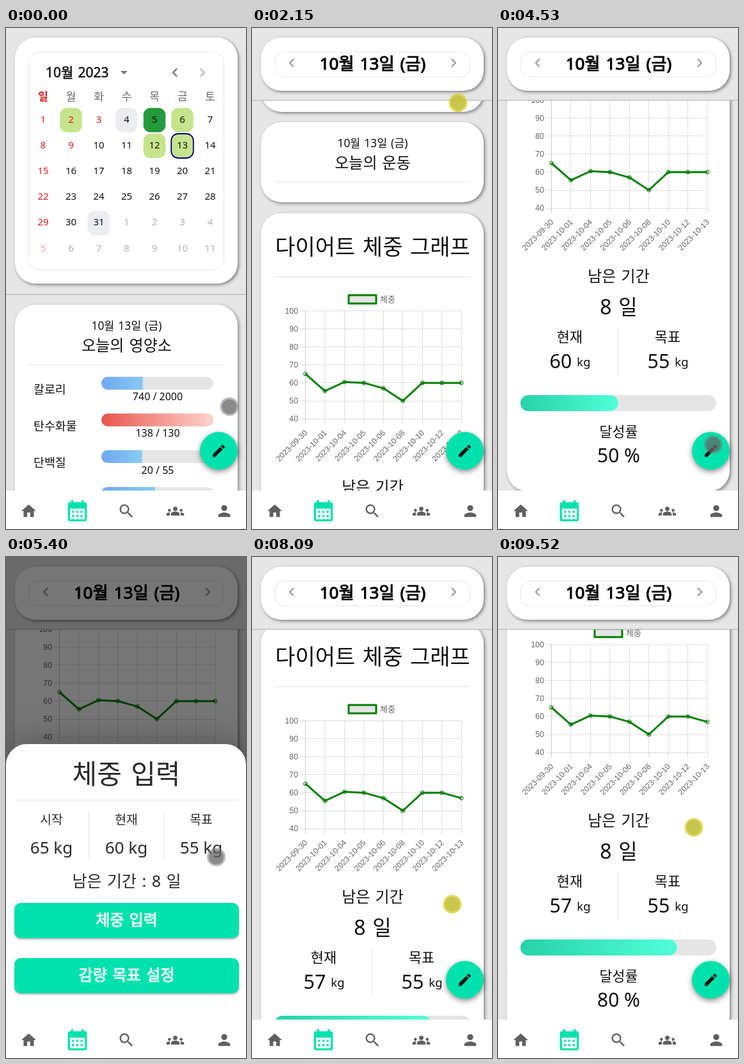
An HTML page with a canvas for the animation above (9920 ms loop, 375 px wide and 782 px high).

```html
<!DOCTYPE html>
<html lang="ko">
<head>
<meta charset="utf-8">
<style>
html, body { margin: 0; width: 100%; height: 100%; overflow: hidden; background: #e6e6e6; }
canvas { display: block; }
</style>
</head>
<body>
<canvas id="stage" width="375" height="782"></canvas>
<script>
const ctx = document.getElementById('stage').getContext('2d');
const LOOP = 9920, NAV_TOP = 722, FOLD_TIME = 1680;
const SANS = '"Noto Sans", "Noto Sans CJK KR", sans-serif';
const ARIAL = '"Liberation Sans", "Noto Sans CJK KR", sans-serif';
const MINT = '#00e2ad', RED = '#e4181c', GREEN = '#008000', TODAY = '10월 13일 (금)';

// time, pointer x, pointer y, list scroll
const TRACK = [
  [390, 349, 591, 0], [900, 292, 396, 0], [1330, 306, 462, 0], [1400, 306, 462, 0],
  [2150, 322, 117, 345], [2480, 322, 20, 442], [2900, 328, 567, 442], [3440, 315, 395, 614],
  [3627, 312, 335, 674], [3760, 312, 335, 674], [4390, 338, 645, 674], [4800, 333, 660, 674],
  [5080, 333, 660, 674], [5400, 329, 468, 674], [5650, 215, 550, 674], [5930, 215, 550, 674],
  [6460, 190, 385, 674], [6720, 190, 385, 674], [7120, 135, 458, 674], [7580, 135, 458, 674],
  [7800, 305, 399, 674], [8090, 313, 542, 531], [8570, 310, 487, 586], [9520, 306, 422, 650],
];
const PRESSES = [[1400, 2480], [2900, 3760], [4950, 5080], [5860, 5930], [7140, 7210], [7800, LOOP]];

const ICONS = {
  home: 'M10 20v-6h4v6h5v-8h3L12 3 2 12h3v8z',
  calendar: 'M6 2h2v2h8V2h2v2h1a2 2 0 0 1 2 2v14a2 2 0 0 1-2 2H5a2 2 0 0 1-2-2V6a2 2 0 0 1 2-2h1z' +
    'M5 10v10h14V10zM7 12h2v2H7zm4 0h2v2h-2zm4 0h2v2h-2zM7 16h2v2H7zm4 0h2v2h-2zm4 0h2v2h-2z',
  search: 'M15.5 14h-.8l-.3-.3A6.5 6.5 0 1 0 13.7 14.4l.3.3v.8l5 5 1.5-1.5zM9.5 14a4.5 4.5 0 1 1 0-9 4.5 4.5 0 0 1 0 9z',
  groups: 'M9 9a3 3 0 0 1 6 0 3 3 0 0 1-6 0zM6 18v-1.6c0-2.5 3.5-3.65 6-3.65s6 1.15 6 3.65V18z' +
    'M2 11a2 2 0 0 1 4 0 2 2 0 0 1-4 0zM0 18v-1.6c0-2 3-2.5 5.1-2.3a4.5 4.5 0 0 0-.6 2.3V18z' +
    'M18 11a2 2 0 0 1 4 0 2 2 0 0 1-4 0zM24 18v-1.6c0-2-3-2.5-5.1-2.3a4.5 4.5 0 0 1 .6 2.3V18z',
  person: 'M12 12a4 4 0 1 0 0-8 4 4 0 0 0 0 8zm0 2c-2.67 0-8 1.34-8 4v2h16v-2c0-2.66-5.33-4-8-4z',
  edit: 'M3 17.25V21h3.75L17.8 9.94l-3.75-3.75zM20.7 7.04a1 1 0 0 0 0-1.41l-2.33-2.34a1 1 0 0 0-1.41 0l-1.83 1.83 3.75 3.75z',
};

const clamp = v => Math.min(1, Math.max(0, v));
const progress = (t, from, to) => clamp((t - from) / (to - from));
const easeOut = p => 1 - (1 - p) ** 3;

function sample(t) {
  const i = TRACK.findIndex(k => k[0] > t);
  if (i === 0) return TRACK[0].slice(1);
  if (i < 0) return TRACK[TRACK.length - 1].slice(1);
  const a = TRACK[i - 1], b = TRACK[i], p = progress(t, a[0], b[0]);
  return [1, 2, 3].map(n => a[n] + (b[n] - a[n]) * p);
}

// A thin outline of the given width makes the text semi-bold.
function text(s, x, y, size, { color = '#111', align = 'center', weight = 400, font = SANS, outline = 0 } = {}) {
  ctx.font = `${weight} ${size}px ${font}`;
  ctx.wordSpacing = /[가-힣]/.test(s) ? `${size * 0.08}px` : '0px';
  ctx.textAlign = align;
  ctx.fillStyle = ctx.strokeStyle = color;
  ctx.fillText(s, x, y + size * 0.37);
  if (!outline) return;
  ctx.lineWidth = outline;
  ctx.lineJoin = 'round';
  ctx.strokeText(s, x, y + size * 0.37);
}

function box(x, y, w, h, r, fill, { stroke, line = 1, shadow } = {}) {
  ctx.save();
  ctx.beginPath();
  ctx.roundRect(x, y, w, h, r);
  if (shadow) [ctx.shadowOffsetX, ctx.shadowOffsetY, ctx.shadowBlur, ctx.shadowColor] = shadow;
  if (fill) { ctx.fillStyle = fill; ctx.fill(); }
  if (stroke) { ctx.strokeStyle = stroke; ctx.lineWidth = line; ctx.stroke(); }
  ctx.restore();
}

function rect(x, y, w, h, color) {
  ctx.fillStyle = color;
  ctx.fillRect(x, y, w, h);
}

function disc(x, y, r, color) {
  ctx.beginPath();
  ctx.arc(x, y, r, 0, 7);
  ctx.fillStyle = color;
  ctx.fill();
}

function icon(name, x, y, size, color) {
  ctx.save();
  ctx.translate(x - size / 2, y - size / 2);
  ctx.scale(size / 24, size / 24);
  ctx.fillStyle = color;
  ctx.fill(new Path2D(ICONS[name]), 'evenodd');
  ctx.restore();
}

function polyline(points, color, width) {
  ctx.beginPath();
  points.forEach(p => ctx.lineTo(...p));
  ctx.strokeStyle = color;
  ctx.lineWidth = width;
  ctx.stroke();
}

function gradient(x, w, from, to) {
  const g = ctx.createLinearGradient(x, 0, x + w, 0);
  g.addColorStop(0, from);
  g.addColorStop(1, to);
  return g;
}

const card = (y, h) => box(14, y, 348, h, 32, '#fff', { shadow: [2, 2, 5, '#808080'] });
const chevron = (x, y, dir, color) =>
  polyline([[x - 3 * dir, y - 6], [x + 3 * dir, y], [x - 3 * dir, y + 6]], color, 2.2);
const button = (x, y, w, h, label, size, fill = MINT, color = '#fff') => {
  box(x, y, w, h, 10, fill, { shadow: fill === MINT && [0, 2, 3, 'rgba(0,0,0,.3)'] });
  text(label, x + w / 2, y + h / 2 - 1, size, { color, outline: 0.8 });
};

function drawCalendar() {
  card(15, 384);
  box(35.5, 37.5, 305, 340, 16, null, { stroke: '#e6e6e6' });
  text('10월 2023', 62, 69, 21, { align: 'left', outline: 0.5 });
  ctx.fillStyle = '#757575';
  ctx.fill(new Path2D('M179 67h11l-5.5 5.5z'));
  chevron(264, 69.5, -1, '#6b6b6b');
  chevron(307, 69.5, 1, '#b5b5b5');
  const marks = { 2: '#c6e48b', 4: '#ebedf0', 5: '#239a3b', 6: '#c6e48b', 12: '#c6e48b', 13: '#c6e48b', 31: '#ebedf0' };
  [...'일월화수목금토'].forEach((d, i) =>
    text(d, 58 + 43.5 * i, 107, 17, { color: i ? '#666' : RED, weight: i ? 400 : 700 }));
  for (let i = 0; i < 42; i++) {
    const x = 58 + 43.5 * (i % 7), y = 142 + 40.2 * Math.floor(i / 7), day = i + 1;
    const next = day > 31, red = i % 7 === 0 || [2, 3, 9].includes(day);
    if (marks[day]) {
      const today = day === 13 && { stroke: '#000080', line: 1.8 };
      box(x - 17.3, y - 17.2, 34.6, 38, 11, marks[day], today || {});
    }
    text(next ? day - 31 : day, x, y, 15, { color: next ? (red ? '#f4a3a4' : '#b0b0b0') : red ? RED : '#111' });
  }
  rect(0, 415, 375, 1.5, '#bbb');
}

function drawDateBar() {
  card(15, 83);
  box(35.5, 37.5, 305, 38.5, 14, null, { stroke: '#e6e6e6' });
  chevron(62, 54.5, -1, '#999');
  chevron(315, 54.5, 1, '#999');
  text(TODAY, 188.5, 55, 26.2, { color: '#000', outline: 1 });
  rect(0, 112.5, 375, 1, '#b0b0b0');
}

function dayCard(y, h, title) {
  card(y, h);
  text(TODAY, 188.5, y + 33, 17.4);
  text(title, 188.5, y + 63.5, 24);
  rect(35, y + 93, 306, 1, '#e6e6e6');
}

function drawNutrition() {
  dayCard(432, 347, '오늘의 영양소');
  [['칼로리', 740, 2000], ['탄수화물', 138, 130], ['단백질', 20, 55], ['지방', 25, 52]].forEach(([name, value, goal], i) => {
    const y = 544.5 + 57.3 * i, w = 175 * Math.min(1, value / goal);
    text(name, 43, y + 19.5, 18.4, { align: 'left' });
    box(149, y, 175, 20, 10, '#e5e5e5');
    box(149, y, w, 20, w < 175 ? [10, 0, 0, 10] : 10,
      value > goal ? gradient(149, w, '#e8564f', '#ffd3cd') : gradient(149, w, '#70a7ee', '#86cbf4'));
    text(`${value} / ${goal}`, 237, y + 30.5, 16);
  });
}

// Origin is the top gridline of the chart.
function drawWeight(lastWeight, kg, ratio) {
  card(-152, 763);
  text('다이어트 체중 그래프', 188.5, -100, 34, { weight: 300 });
  rect(35, -53, 306, 1, '#e6e6e6');
  box(151, -24, 43, 13, 0, '#e5e5e5', { stroke: GREEN, line: 3 });
  text('체중', 200, -18, 13, { align: 'left', color: '#666', font: ARIAL });

  const label = { align: 'right', color: '#666', font: ARIAL };
  const px = i => 83.5 + 30.45 * i, py = v => (100 - v) * 2.81 + 0.5;
  for (let v = 100; v >= 40; v -= 10) {
    rect(75, Math.round(py(v) - 0.5), 252, 1, 'rgba(0,0,0,.12)');
    text(v, 72, py(v) - 0.5, 12.3, label);
  }
  ['09-30', '10-01', '10-04', '10-05', '10-06', '10-08', '10-10', '10-12', '10-13'].forEach((day, i) => {
    rect(Math.floor(px(i)), 0, 1, 177, `rgba(0,0,0,${i ? 0.12 : 0.2})`);
    ctx.save();
    ctx.translate(px(i) + 0.5, 188.5);
    ctx.rotate(-Math.PI / 4);
    text('2023-' + day, 0, 0, 12.3, label);
    ctx.restore();
  });
  const points = [65, 55.5, 60.5, 60, 57, 50, 60, 60, lastWeight].map((v, i) => [px(i), py(v)]);
  polyline(points, GREEN, 3);
  for (const [x, y] of points) {
    disc(x, y, 3, 'rgba(0,0,0,.1)');
    ctx.strokeStyle = GREEN;
    ctx.lineWidth = 1;
    ctx.stroke();
  }

  text('남은 기간', 188.5, 275, 24);
  text('8 일', 188.5, 323, 32);
  [['현재', kg, 112], ['목표', 55, 265]].forEach(([name, value, x]) => {
    text(name, x, 370, 22);
    text(value, x - 14, 408, 30.5);
    text('kg', x + 22, 409, 18.5);
  });
  rect(187, 356, 1, 76, '#e6e6e6');
  box(35, 461, 306, 25, 12.5, '#e5e5e5');
  box(35, 461, 306 * ratio, 25, 12.5, gradient(35, 306 * ratio, '#26d2a8', '#52ffd7'));
  text('달성률', 188.5, 518, 21.7);
  text(`${Math.round(ratio * 100)} %`, 188.5, 555, 30);
}

function drawSheet(top, kg) {
  const soft = { color: '#2a2a2a', weight: 300 };
  ctx.save();
  ctx.translate(0, top);
  box(0, 0, 375, 800, [32, 32, 0, 0], '#fff', { shadow: [0, -5, 50, 'rgba(0,0,0,.25)'] });
  text('체중 입력', 188, 46, 42, soft);
  rect(13, 87, 351, 1, '#e6e6e6');
  [['시작', 65], ['현재', kg], ['목표', 55]].forEach(([name, value], i) => {
    const x = 71 + 117 * i;
    text(name, x, 118, 19.3, soft);
    text(`${value} kg`, x, 161, 26, soft);
    if (i) rect(x - 59, 103, 1, 78, '#e6e6e6');
  });
  text('남은 기간 : 8 일', 188.5, 214, 25, soft);
  button(13, 248, 351, 55, '체중 입력', 24);
  button(13, 334, 351, 55, '감량 목표 설정', 24.2);
  ctx.restore();
}

function drawDialog(typed) {
  box(18, 275, 340, 235, 20, '#fff', { shadow: [0, 10, 30, 'rgba(0,0,0,.4)'] });
  text('체중 입력', 188, 321, 36.3, { weight: 300 });
  box(35.5, 352.5, 305, 63, 10, null, { stroke: '#c4c4c4' });
  text(typed, 50, 384, 24, { align: 'left' });
  text('(kg)', 327, 383, 17.7, { align: 'right', color: '#777' });
  button(48, 432, 117, 45, '설정', 18.5, typed ? MINT : '#a3e2d1', typed ? '#fff' : '#86bcae');
  button(212, 432, 117, 45, '취소', 18.5);
}

function drawNav() {
  rect(0, NAV_TOP, 375, 60, '#fff');
  icon('home', 35.5, 754, 27.5, '#5f5f5f');
  icon('calendar', 111.5, 753.5, 39.5, MINT);
  icon('search', 188, 754, 28, '#5f5f5f');
  icon('groups', 264.5, 754, 27.5, '#5f5f5f');
  icon('person', 341, 754, 28, '#5f5f5f');
}

function drawPointer(x, y, pressed) {
  disc(x, y, 14.5, pressed ? 'rgba(212,208,40,.75)' : 'rgba(120,120,120,.5)');
  disc(x, y, 11.5, pressed ? 'rgba(178,176,60,.5)' : 'rgba(90,90,90,.5)');
}

function draw(t) {
  const [x, y, scroll] = sample(t);
  const folded = t >= FOLD_TIME, saved = t >= 7310;
  const kg = saved ? 57 : 60, update = easeOut(progress(t, 7580, 8000));
  const clipTop = folded ? 113 : 416;

  rect(0, 0, 375, 782, '#e6e6e6');
  ctx.save();
  ctx.beginPath();
  ctx.rect(0, clipTop, 375, NAV_TOP - clipTop);
  ctx.clip();
  ctx.translate(0, -Math.round(scroll) - (folded ? 303 : 0));
  drawNutrition();
  dayCard(795, 125, '오늘의 운동');
  ctx.translate(0, 1089);
  drawWeight(60 - 3 * update, kg, 0.5 + 0.3 * update);
  ctx.restore();
  if (folded) drawDateBar(); else drawCalendar();

  box(303, 630.5, 59, 59, 29.5, MINT, { shadow: [0, 3, 8, 'rgba(0,0,0,.45)'] });
  icon('edit', 332.5, 660, 25, '#111');

  const open = easeOut(progress(t, 5100, 5520)) * (1 - progress(t, 7580, 7770));
  if (open > 0) {
    rect(0, 0, 375, NAV_TOP, `rgba(0,0,0,${0.55 * open})`);
    drawSheet(NAV_TOP - 440 * open, kg);
  }
  drawNav();

  if (t >= 5930 && !saved) {
    ctx.globalAlpha = progress(t, 5930, 6150);
    rect(0, 0, 375, 782, 'rgba(0,0,0,.5)');
    drawDialog(t < 6460 || t >= 7190 ? '' : t < 6720 ? '5' : '57');
    ctx.globalAlpha = 1;
  }
  drawPointer(x, y, PRESSES.some(([from, to]) => t >= from && t < to));
}

const start = performance.now();
function frame() {
  draw((performance.now() - start) % LOOP);
  requestAnimationFrame(frame);
}
frame();
</script>
</body>
</html>
```
